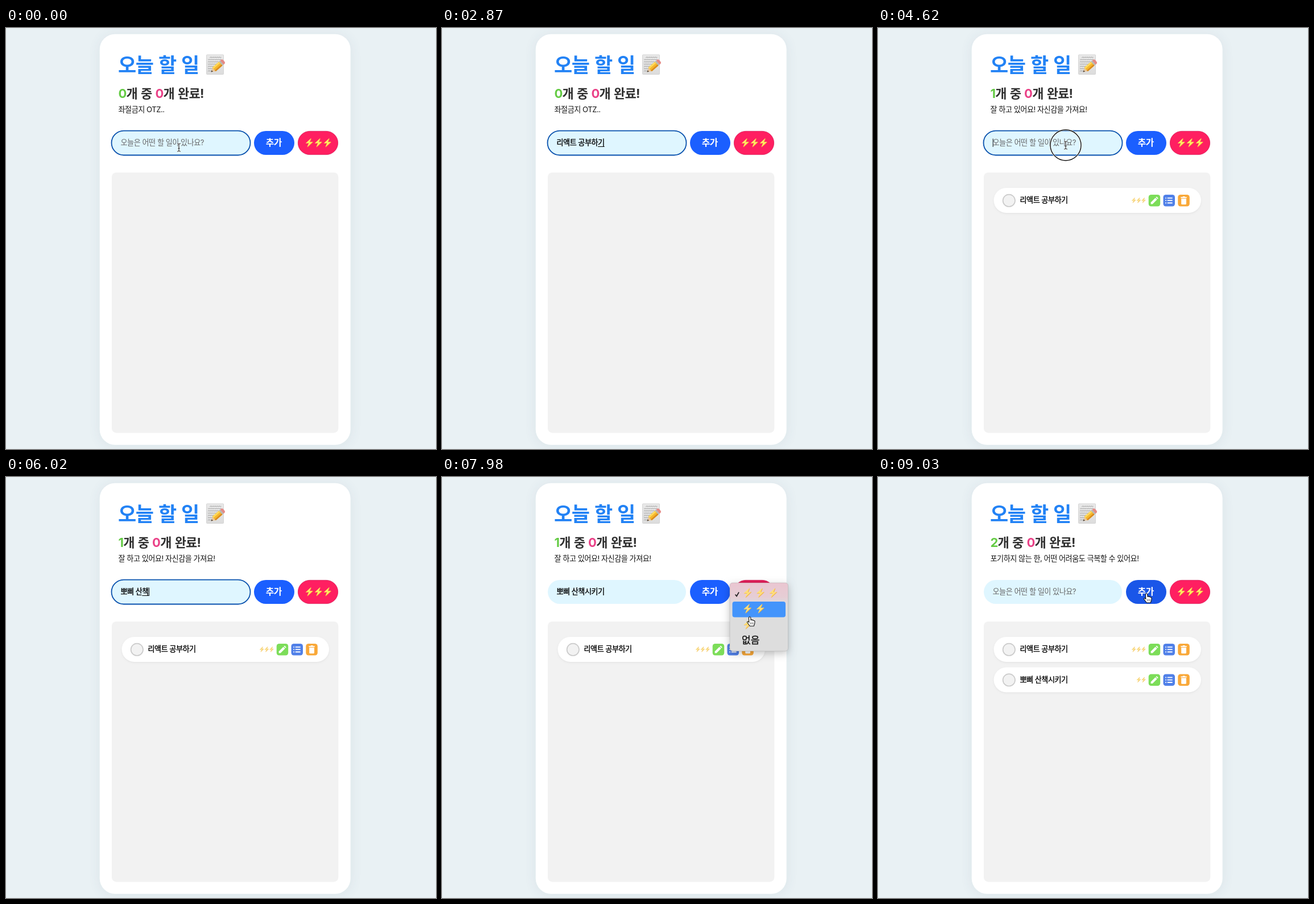
Recreate the animation shown at these times as an HTML page with a canvas. Size 756 by 740 pixels, loop 9240 ms.

```html
<!DOCTYPE html>
<html lang="ko">
<head>
<meta charset="utf-8">
<title>오늘 할 일</title>
<style>
html, body { margin: 0; width: 100%; height: 100%; overflow: hidden; background: #e9f1f4; }
canvas { display: block; width: 756px; height: 740px; }
</style>
</head>
<body>
<canvas id="stage"></canvas>
<script>
const W = 756, H = 740, LOOP = 9240;
const canvas = document.getElementById('stage');
const ctx = canvas.getContext('2d');
const dpr = window.devicePixelRatio || 1;
canvas.width = W * dpr;
canvas.height = H * dpr;

const FAMILY = 'Inter, "Noto Sans CJK KR", "Noto Sans CJK", sans-serif';
const BODY = 13.1;
const INPUT = [186, 181, 243, 42], ADD = [436, 181, 71, 42], LEVEL = [513, 181, 71, 42];
const FIRST = '리액트 공부하기', SECOND = '뽀삐 산책시키기';

// Key times and the composed text after each key
const typed1 = {
  times: [980, 1090, 1200, 1310, 1420, 1550, 1680, 1750, 1820, 1890, 1960, 2030, 2130, 2240, 2350, 2470, 2590],
  texts: 'ㄹ,리,링,리애,리액,리액ㅌ,리액트,리액트 ,리액트 ㄱ,리액트 고,리액트 공,리액트 공ㅂ,리액트 공부,리액트 공붛,리액트 공부하,리액트 공부학,리액트 공부하기'.split(',')
};
const typed2 = {
  times: [5180, 5250, 5320, 5390, 5460, 5560, 5650, 5740, 5830, 5920, 6020, 6230, 6300, 6370, 6440, 6580, 6720],
  texts: 'ㅃ,뽀,뽀ㅃ,뽀삐,뽀삐 ,뽀삐 ㅅ,뽀삐 사,뽀삐 산,뽀삐 산ㅊ,뽀삐 산채,뽀삐 산책,뽀삐 산\uCC47,뽀삐 산책시,뽀삐 산책싴,뽀삐 산책시키,뽀삐 산책시킥,뽀삐 산책시키기'.split(',')
};
const path = [
  [0, 304, 210], [3360, 304, 210], [3710, 468, 202], [4060, 468, 202], [4480, 330, 206],
  [7140, 330, 206], [7490, 518.5, 216.5], [7630, 537, 208], [7770, 537, 210],
  [7980, 541, 246], [8120, 541, 238], [8400, 541, 238], [8680, 472, 205]
];
const presses = [3710, 4550, 7600, 8260, 8680];

const between = (t, a, b) => t >= a && t < b;
const ease = u => u * u * (3 - 2 * u);

function cursorAt(t) {
  let i = 0;
  while (i < path.length - 1 && path[i + 1][0] <= t) i++;
  const a = path[i], b = path[i + 1] || a;
  const u = b === a ? 0 : ease((t - a[0]) / (b[0] - a[0]));
  return { x: a[1] + (b[1] - a[1]) * u, y: a[2] + (b[2] - a[2]) * u };
}

function lastText(list, t) {
  let s = '';
  list.times.forEach((k, i) => { if (t >= k) s = list.texts[i]; });
  return s;
}

function inPill(p, [x, y, w, h]) {
  const r = h / 2, cx = Math.min(Math.max(p.x, x + r), x + w - r);
  return Math.hypot(p.x - cx, p.y - y - r) <= r;
}

function box(x, y, w, h, r, fill, stroke, line = 1) {
  ctx.beginPath();
  ctx.roundRect(x, y, w, h, r);
  if (fill) { ctx.fillStyle = fill; ctx.fill(); }
  if (stroke) { ctx.strokeStyle = stroke; ctx.lineWidth = line; ctx.stroke(); }
}

function shadowed(color, blur, dy, draw) {
  ctx.save();
  ctx.shadowColor = color;
  ctx.shadowBlur = blur * dpr;
  ctx.shadowOffsetY = dy * dpr;
  draw();
  ctx.restore();
}

function setFont(size, weight, tight = 0.035) {
  ctx.font = `${weight} ${size}px ${FAMILY}`;
  ctx.letterSpacing = -size * tight + 'px';
  ctx.wordSpacing = (weight === 700 ? size * .07 : 0) + 'px';
}

function text(s, x, y, size, weight, color, tight) {
  setFont(size, weight, tight);
  ctx.fillStyle = color;
  ctx.fillText(s, x, y);
  // Medium Hangul is a regular face with a hairline outline
  if (weight === 500) {
    ctx.strokeStyle = color;
    ctx.lineWidth = .35;
    ctx.strokeText(s, x, y);
  }
  return x + ctx.measureText(s).width;
}

function poly(points, fill) {
  ctx.beginPath();
  points.forEach(([x, y]) => ctx.lineTo(x, y));
  ctx.closePath();
  ctx.fillStyle = fill;
  ctx.fill();
}

function stroke(d, color, width) {
  ctx.strokeStyle = color;
  ctx.lineWidth = width;
  ctx.stroke(new Path2D(d));
}

const BOLT = [[.74, 0], [.06, .57], [.46, .53], [.24, 1], [.94, .4], [.54, .44]];
function bolts(n, x, y, w, h, pitch, light, dark) {
  for (let i = 0; i < n; i++) {
    const at = (dx, dy) => BOLT.map(([u, v]) => [x + i * pitch + u * w + dx, y + v * h + dy]);
    poly(at(0, 0), dark);
    poly(at(-w * .05, -h * .03), light);
  }
}

function memo() {
  const g = ctx.createLinearGradient(0, 47, 0, 82);
  g.addColorStop(0, '#e9e9e9');
  g.addColorStop(1, '#dcdcdc');
  box(352.5, 47, 30, 34.5, 1, g, '#cdcdcd', .8);
  ctx.strokeStyle = '#8e8e8e';
  ctx.lineWidth = .8;
  for (let row = 0; row < 7; row++) {
    const y = 51.5 + row * 4, end = row < 4 ? 379 : 366;
    ctx.beginPath();
    for (let x = row ? 355 : 358; x < end; x += .6)
      ctx.lineTo(x, y + Math.sin(x * 2.6 + row * 4) * .8 * Math.sin(x * .9 + row));
    ctx.stroke();
  }
  ctx.save();
  ctx.translate(360.5, 77.5);
  ctx.rotate(-.72);
  poly([[0, 0], [8, -4.6], [8, 4.6]], '#e9c79b');
  poly([[0, 0], [3, -1.7], [3, 1.7]], '#4a4038');
  box(7, -4.6, 16, 9.2, 0, '#f6b72c');
  box(7, -4.6, 16, 3, 0, '#ffd95c');
  box(7, 2, 16, 2.6, 0, '#d98a1f');
  box(22.5, -4.6, 3.2, 9.2, 0, '#b9b9b4');
  box(25.5, -4.6, 4.5, 9.2, [0, 3, 3, 0], '#e58a86');
  ctx.restore();
}

function item(label, y, level) {
  shadowed('rgba(0,0,0,.055)', 3, 1.5, () => box(203.5, y, 364.5, 44, 22, '#fff'));
  ctx.beginPath();
  ctx.arc(230.3, y + 22.3, 10.7, 0, 7);
  ctx.fillStyle = '#f2f2f2';
  ctx.fill();
  ctx.strokeStyle = '#cbcbcb';
  ctx.lineWidth = 1.7;
  ctx.stroke();
  text(label, 249.5, y + 26.3, BODY, 500, '#000');
  bolts(level, 471.5 - level * 8.6, y + 17, 8.4, 10, 8.6, '#fae08a', '#eeb04c');
  ['#7cdd59', '#5080e8', '#f9a838'].forEach((c, i) => box(475.7 + i * 25.8, y + 12, 20.5, 20.5, 4.5, c));
  ctx.save();
  ctx.translate(475.7, y + 12);
  poly([[4, 13.5], [12, 5.5], [15, 8.5], [7, 16.5], [4, 16.5]], '#fff');
  poly([[12.8, 4.7], [14.2, 3.5], [17, 6.3], [15.8, 7.7]], '#fff');
  for (let i = 0; i < 3; i++) {
    box(29.5, 5 + i * 4.3, 1.8, 1.8, .4, '#fff');
    box(33, 5 + i * 4.3, 9, 1.8, .4, '#fff');
  }
  box(56.7, 4, 10.4, 1.8, .4, '#fff');
  box(60, 3, 4, 1.6, .4, '#fff');
  box(57.5, 6.8, 8.8, 10.5, [0, 0, 1.5, 1.5], '#fff');
  ctx.restore();
}

function popup(row) {
  shadowed('rgba(0,0,0,.24)', 14, 4, () => box(506, 186, 102.5, 120, 5, '#dddddd'));
  ctx.save();
  box(506, 186, 102.5, 120, 5);
  ctx.clip();
  const g = ctx.createLinearGradient(0, 186, 0, 232);
  g.addColorStop(0, 'rgba(235,196,208,.95)');
  g.addColorStop(.55, 'rgba(232,202,211,.8)');
  g.addColorStop(1, 'rgba(221,221,221,0)');
  ctx.fillStyle = g;
  ctx.fillRect(506, 186, 102.5, 46);
  ctx.restore();
  box(506, 186, 102.5, 120, 5, null, 'rgba(150,150,150,.45)', .7);
  box(510.5, 219 + (row - 1) * 27.6, 93.5, 27.5, 4, '#4394fb');
  stroke('M515.5 206.5 L518 209.5 L522 202.5', row ? '#222' : '#fff', 1.7);
  [3, 2, 1].forEach((n, i) => bolts(n, 530, 195.5 + i * 27.8, 15.5, 17, 22.5, '#ffdf7a', '#eda43a'));
  text('없음', 527, 293, 17, 500, '#111', 0);
}

const HAND = new Path2D('M-1.7 1 Q0 -1.6 1.7 1 L2 5.4 Q3.6 4.2 4.6 5.7 Q6.2 4.8 7 6.5 Q9 6.1 9 8.2 L8.7 11.5 L7.2 16 L.3 16 L-4.2 10 Q-5 7.6 -2.7 8 L-1.2 9.6 Z');
const ARROW = new Path2D('M0 0 L0 12.6 L2.9 10 L4.8 14.2 L6.8 13.3 L4.9 9.3 L8.7 9.1 Z');
const BEAM = 'M-3 -7 Q-.3 -7 0 -5.5 Q.3 -7 3 -7 M0 -5.5 V5.5 M-3 7 Q-.3 7 0 5.5 Q.3 7 3 7 M-1.5 1.5 H1.5';

function cursor(p, kind) {
  ctx.save();
  ctx.translate(p.x, p.y);
  ctx.lineJoin = 'round';
  if (kind === 'beam') {
    stroke(BEAM, 'rgba(255,255,255,.8)', 2.6);
    stroke(BEAM, '#222', 1.1);
  } else if (kind === 'hand') {
    ctx.fillStyle = '#fff';
    ctx.fill(HAND);
    ctx.strokeStyle = '#111';
    ctx.lineWidth = 1.1;
    ctx.stroke(HAND);
    stroke('M1.5 9.5 V13 M3.8 9.5 V13 M6 9.5 V13', '#444', .8);
  } else {
    ctx.strokeStyle = '#fff';
    ctx.lineWidth = 2.2;
    ctx.stroke(ARROW);
    ctx.fillStyle = '#000';
    ctx.fill(ARROW);
  }
  ctx.restore();
}

function ring(p) {
  ctx.beginPath();
  ctx.arc(p.x, p.y, 27, 0, 7);
  ctx.strokeStyle = 'rgba(255,255,255,.8)';
  ctx.lineWidth = 3;
  ctx.stroke();
  ctx.strokeStyle = '#111';
  ctx.lineWidth = 1.4;
  ctx.stroke();
}

function field(t) {
  const focus = t < 3850 || between(t, 4550, 7630);
  const typing = t < 3850 ? lastText(typed1, t) : t < 8820 ? lastText(typed2, t) : '';
  const composing = between(t, 980, 3710) || between(t, 5180, 7600);
  box(...INPUT, 21, '#dff6ff');
  if (focus) box(185.5, 180.7, 244, 42.8, 21.4, null, '#0750ad', 1.8);
  if (!typing) text('오늘은 어떤 할 일이 있나요?', 201.5, 206.3, BODY, 400, '#666');
  else text(typing, 201.5, 206.3, BODY, 500, '#000');
  setFont(BODY, 500);
  const end = 201.5 + ctx.measureText(typing).width;
  if (composing && typing && !typing.endsWith(' ')) {
    const start = 201.5 + ctx.measureText(typing.slice(0, -1)).width;
    ctx.fillStyle = '#000';
    ctx.fillRect(start, 208, end - start, 1);
  }
  const caret = between(t, 70, 560) || between(t, 980, 2870) || between(t, 3360, 3850) ||
    between(t, 4550, 5040) || between(t, 5180, 6860);
  if (caret) {
    ctx.fillStyle = '#111';
    ctx.fillRect(end + .2, 194.5, 1, 14.5);
  }
}

function render(t) {
  const p = cursorAt(t);
  const count = t < 3850 ? 0 : t < 8820 ? 1 : 2;
  const open = between(t, 7700, 8400);
  const visible = !between(t, 980, 3360) && !between(t, 5180, 7140);
  const overAdd = visible && inPill(p, ADD);
  const overLevel = visible && (open || inPill(p, LEVEL));

  ctx.setTransform(dpr, 0, 0, dpr, 0, 0);
  ctx.fillStyle = '#e9f1f4';
  ctx.fillRect(0, 0, W, H);
  shadowed('rgba(60,90,120,.09)', 22, 2, () => box(164.7, 10.7, 441, 722, 27, '#fff'));

  text('오늘 할 일', 197, 78, 35, 700, '#2282f5', .04);
  memo();
  let x = text(String(count), 197.5, 123, 22, 700, '#65cb45');
  x = text('개 중 ', x, 123, 22, 700, '#303030');
  x = text('0', x, 123, 22, 700, '#ea4288');
  text('개 완료!', x, 123, 22, 700, '#303030');
  const cheer = ['좌절금지 OTZ..', '잘 하고 있어요! 자신감을 가져요!', '포기하지 않는 한, 어떤 어려움도 극복할 수 있어요!'];
  text(cheer[count], 197.5, 148, BODY, 400, '#111');

  field(t);
  box(...ADD, 21, overAdd ? '#1a56e8' : '#1b5fff');
  text('추가', 456.7, 207, 15.8, 600, '#fff');
  box(513.4, 181.4, 70.2, 41.2, 20.6, overLevel ? '#e31c59' : '#ff1f61', '#d81b58', .8);
  bolts(between(t, 8400, 8820) ? 2 : 3, 526.5, 194, 14.5, 16, 16, '#ffed63', '#f3a63a');

  box(186, 254, 398.3, 457.7, 8, '#f2f2f2');
  if (count > 0) item(FIRST, 281, 3);
  if (count > 1) item(SECOND, 334.5, 2);
  if (open) popup(p.y < 219 ? 0 : p.y < 247 ? 1 : 2);

  if (visible) {
    if (presses.some(k => between(t, k, k + 140))) ring(p);
    cursor(p, overAdd || overLevel ? 'hand' : inPill(p, INPUT) ? 'beam' : 'arrow');
  }
}

const began = performance.now();
function tick() {
  render((performance.now() - began) % LOOP);
  requestAnimationFrame(tick);
}
tick();
</script>
</body>
</html>
```
